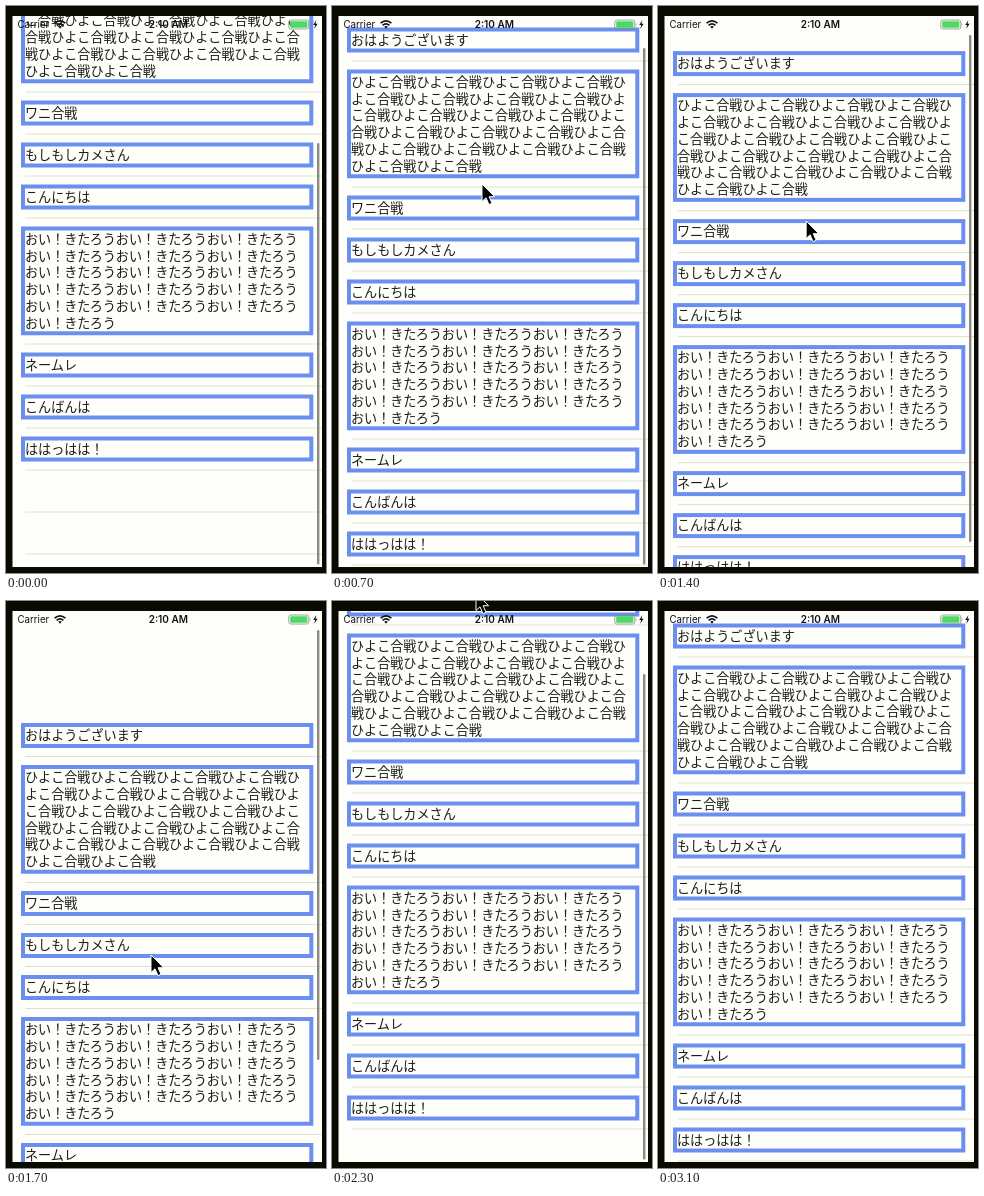
These frames come from a looping animation (320 px wide and 567 px high, 3.2 s). An HTML page:

```html
<!DOCTYPE html>
<html lang="ja">
<head>
<meta charset="utf-8">
<title>Bouncing list</title>
<style>
  html, body { margin: 0; width: 100%; height: 100%; overflow: hidden; background: #0b0a00; }
  svg { display: block; width: 100%; height: 100%; }
  #list text { font: 13.1px "Noto Sans CJK JP", "Noto Sans CJK", sans-serif; fill: #1c1c18; }
  .status { font: 9.7px Inter, Roboto, sans-serif; fill: #111; }
  .clock { font-size: 10px; font-weight: 600; text-anchor: middle; }
</style>
</head>
<body>
<svg viewBox="0 0 320 567">
  <defs>
    <clipPath id="screen"><rect x="6.5" y="10" width="309.5" height="551"/></clipPath>
  </defs>
  <rect width="320" height="567" fill="#0b0a00"/>
  <rect x="6.5" y="10" width="309.5" height="551" fill="#fefefa"/>
  <g clip-path="url(#screen)">
    <g id="list"></g>
    <rect id="bar" x="311" width="2.4" rx="1.2" fill="#77776b" fill-opacity=".85"/>
  </g>

  <text class="status" x="11.5" y="22">Carrier</text>
  <g fill="none" stroke="#111" stroke-width="1.7">
    <path d="M48.6 17.2Q54 12.4 59.4 17.2"/>
    <path d="M50.6 19.4Q54 16.4 57.4 19.4"/>
    <path d="M52.2 20.6L54 22.8L55.8 20.6Q54 19.2 52.2 20.6Z" fill="#111" stroke="none"/>
  </g>
  <text class="status clock" x="162.3" y="22">2:10 AM</text>
  <rect x="282.8" y="14" width="20" height="9" rx="2" fill="none" stroke="#8a8a84" stroke-width=".8"/>
  <rect x="284.2" y="15.3" width="17.2" height="6.4" rx="1" fill="#4cd964"/>
  <path d="M303.9 16.8q1.4 1.6 0 3.4z" fill="#8a8a84"/>
  <path d="M310.4 14L307.2 19H309.2L308.2 23L311.6 17.7H309.5Z" fill="#111"/>

  <path id="cursor" d="M0 0V17.5L4 13.8L7 20.6L10 19.3L7.1 12.7H12.6Z"
        fill="#000" stroke="#fff" stroke-width="1" stroke-linejoin="round"/>
</svg>
<script>
const LOOP = 3200, STEP = 100;
const TOP = 14, ROW = 42, LINE = 16.75, PER_LINE = 21;
const rows = [
  "おはようございます", "ひよこ合戦".repeat(23), "ワニ合戦", "もしもしカメさん",
  "こんにちは", "おい！きたろう".repeat(16), "ネームレ", "こんばんは", "ははっはは！"
];

// [ms, value]
const dragKeys = [
  [700, -1], [800, -11], [1000, -41.5], [1100, -43], [1300, -8], [1500, 55],
  [1700, 99.5], [1800, 92], [1950, 22], [2100, -49], [2200, -57],
  [2300, -32], [2400, -13], [2500, -4], [2600, -1], [2800, -.3], [3000, 0], [3200, 0]
];
const cursorX = [[400, 143.5], [700, 150], [1000, 152], [1700, 145], [2100, 144], [2400, 144]];
const cursorY = [
  [400, 44.5], [700, 178], [1000, 86.5], [1100, 84], [1400, 215],
  [1700, 354], [1800, 340], [2100, 0], [2400, -9]
];

const $ = id => document.getElementById(id);
const list = $("list"), bar = $("bar"), cursor = $("cursor");

function add(tag, attrs, text = "") {
  const el = document.createElementNS("http://www.w3.org/2000/svg", tag);
  for (const name in attrs) el.setAttribute(name, attrs[name]);
  el.textContent = text;
  list.append(el);
}

function separator(y) {
  add("path", { d: `M19.5 ${y}H316`, stroke: "#d9d9c4", "stroke-width": .8 });
}

function buildList() {
  let y = TOP;
  for (const row of rows) {
    const lines = row.match(new RegExp(`.{1,${PER_LINE}}`, "g"));
    const extra = (lines.length - 1) * LINE;
    add("rect", {
      x: 17, y: y + 10.5, width: 288.3, height: 21 + extra,
      fill: "none", stroke: "#6a8ff0", "stroke-width": 4
    });
    lines.forEach((line, i) => add("text", { x: 19, y: y + 25.8 + i * LINE }, line));
    y += ROW + (lines.length > 1 ? 84 : 0);
    separator(y);
  }
  for (let i = 1; i < 4; i++) separator(y + i * ROW);
}

// Cubic through the keys; flat at turning points.
function track(keys, t) {
  const last = keys.length - 1;
  if (t <= keys[0][0]) return keys[0][1];
  if (t >= keys[last][0]) return keys[last][1];
  const i = keys.findIndex(k => k[0] > t) - 1;
  const slope = j => (keys[j + 1][1] - keys[j][1]) / (keys[j + 1][0] - keys[j][0]);
  const tangent = j => {
    if (j === 0 || j === last) return 0;
    const a = slope(j - 1), b = slope(j);
    return a * b > 0 ? 2 * a * b / (a + b) : 0;
  };
  const [t0, a] = keys[i], [t1, b] = keys[i + 1];
  const d = t1 - t0, u = (t - t0) / d, v = 1 - u;
  return a * v * v * (1 + 2 * u) + b * u * u * (3 - 2 * u)
    + d * u * v * (tangent(i) * v - tangent(i + 1) * u);
}

function offsetAt(t) {
  if (t >= 700) return track(dragKeys, t);
  const k = 9.75 * t / 1000;
  return -96 * (1 + k) * Math.exp(-k);
}

function draw(t) {
  const off = offsetAt(t);
  list.setAttribute("transform", `translate(0 ${off.toFixed(2)})`);

  const top = Math.max(29, 41 - off);
  const bottom = 558.5 - Math.max(0, off);
  bar.setAttribute("y", top);
  bar.setAttribute("height", bottom - top);
  bar.setAttribute("opacity", Math.min(1, Math.max(0, (3100 - t) / 300)));

  const shown = t >= 400 && t <= 2400;
  cursor.setAttribute("visibility", shown ? "visible" : "hidden");
  cursor.setAttribute("transform", `translate(${track(cursorX, t)} ${track(cursorY, t)})`);
}

const start = performance.now();
function tick() {
  const t = (performance.now() - start) % LOOP;
  draw(Math.floor(t / STEP) * STEP);
  requestAnimationFrame(tick);
}

buildList();
tick();
</script>
</body>
</html>
```
